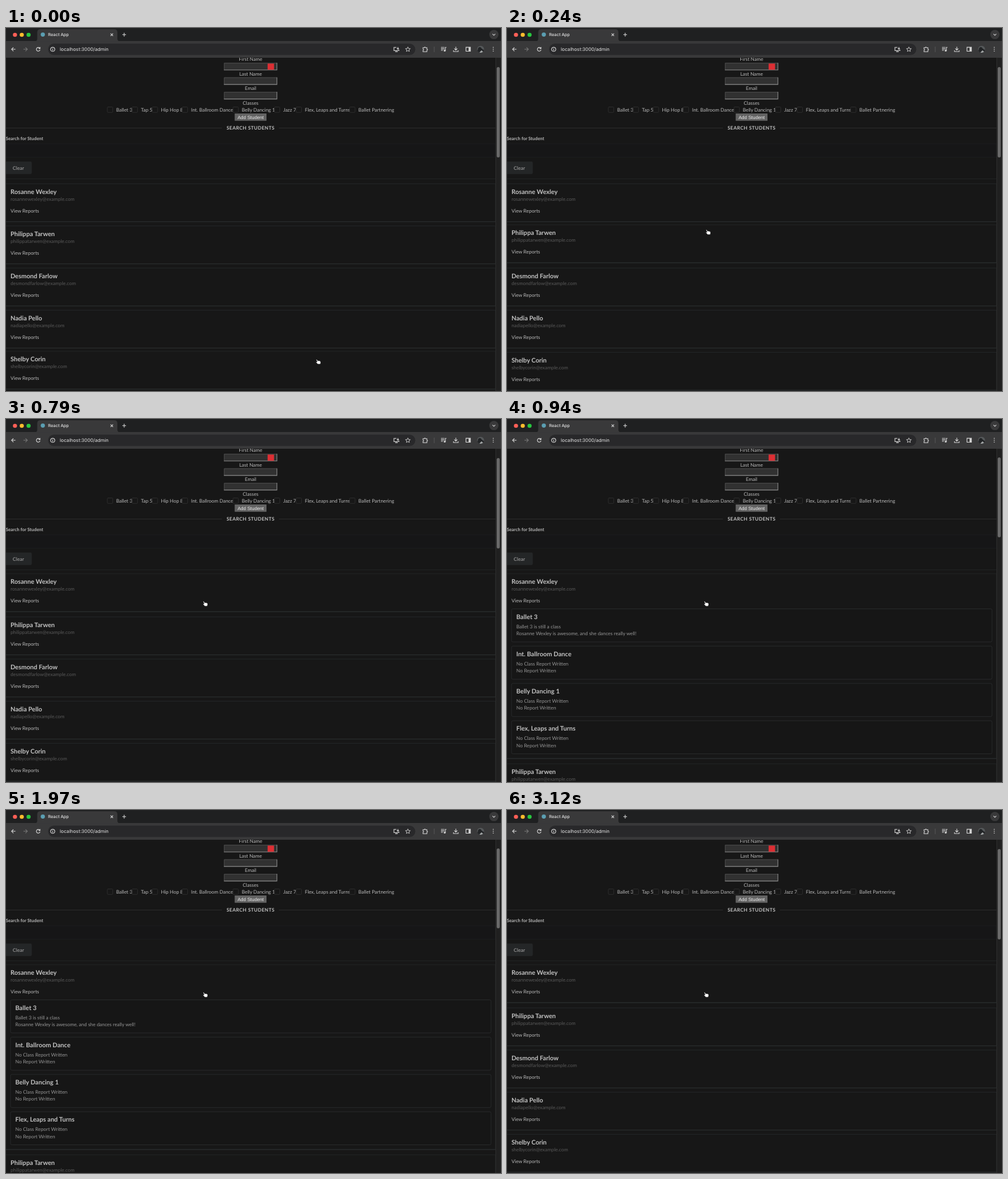
Recreate the animation shown at these times as an HTML page. Size 800 by 586 pixels, loop 3.24 s.

```html
<!DOCTYPE html>
<html lang="en">
<head>
<meta charset="utf-8">
<title>React App</title>
<style>
  html, body { margin: 0; width: 100%; height: 100%; overflow: hidden; background: #171717; }
  svg { display: block; width: 100vw; height: 100vh; }
  text { font-family: Lato, sans-serif; font-size: 7.9px; fill: #b8b8b8; text-rendering: geometricPrecision; white-space: pre; }
  .ui { font-family: Inter, sans-serif; fill: #e6e6e6; }
  .name { font-size: 10.16px; font-weight: 700; fill: #c2c2c2; }
  .mail { fill: #585858; }
  .body { fill: #959595; }
  .icon { fill: none; stroke: #d2d2d2; stroke-width: 1.1; }
</style>
</head>
<body>
<svg id="stage" viewBox="0 0 800 586" preserveAspectRatio="none"></svg>
<script>
const LOOP = 3240, OPEN = 820, CLOSE = 2820;
const LIFT = 1.7, GROW = 237.2, ROW = 68;

// name, hover start, hover end (ms)
const students = [
  ['Rosanne Wexley', 350, 1e6],
  ['Philippa Tarwen', 112, 330],
  ['Desmond Farlow', 70, 112],
  ['Nadia Pello', 20, 70],
  ['Shelby Corin', -1e3, 20],
];
const reports = ['Ballet 3', 'Int. Ballroom Dance', 'Belly Dancing 1', 'Flex, Leaps and Turns'];
const classes = [
  ['Ballet 3', 178], ['Tap 5', 218], ['Hip Hop 8', 250.5], ['Int. Ballroom Dance', 299],
  ['Belly Dancing 1', 381], ['Jazz 7', 448], ['Flex, Leaps and Turns', 483], ['Ballet Partnering', 569.5],
];
// time, x, y
const track = [
  [0, 506, 540], [120, 353, 377], [200, 330, 338],
  [300, 322, 322], [390, 321, 306], [550, 322, 298],
];

const text = (x, y, s, attrs = '') => `<text x="${x}" y="${y}" ${attrs}>${s}</text>`;
const mid = (y, s, attrs = '') => text(395.3, y, s, `text-anchor="middle" ${attrs}`);
const rect = (x, y, w, h, fill, attrs = '') =>
  `<rect x="${x}" y="${y}" width="${w}" height="${h}" fill="${fill}" ${attrs}/>`;
const circle = (x, y, r, fill, attrs = '') => `<circle cx="${x}" cy="${y}" r="${r}" fill="${fill}" ${attrs}/>`;
const icon = (x, y, d, attrs = '') => `<path class="icon" transform="translate(${x} ${y})" d="${d}" ${attrs}/>`;

function browser() {
  const lights = ['#fe5f57', '#febc2e', '#28c840'].map((c, i) => circle(14.5 + 11 * i, 11, 3.3, c)).join('');
  const dots = [-3, 0, 3].map(d => circle(787.5, 34.3 + d, 0.8, '#d2d2d2')).join('');
  return rect(0, 0, 800, 22, '#1f2021') + rect(0, 21, 800, 27, '#39393a') + lights +
    '<path fill="#39393a" d="M46 21.5Q50.5 21.5 50.5 17V7Q50.5 2 55.5 2H175Q180 2 180 7V17Q180 21.5 184.5 21.5Z"/>' +
    circle(59.5, 10.6, 3.4, '#5b9fb2') +
    text(68, 13.1, 'React App', 'class="ui" style="font-size:6.8px;font-weight:500"') +
    icon(171, 10.8, 'M-2-2L2 2M2-2L-2 2') +
    icon(191, 10.8, 'M-3 0H3M0-3V3') +
    circle(788.5, 10.6, 7.5, '#39393a') + icon(788.5, 10.6, 'M-2.2-1L0 1.2L2.2-1') +
    icon(12, 34.3, 'M3.3 0H-3M0-3L-3 0L0 3') +
    icon(31.5, 34.3, 'M-3.3 0H3M0-3L3 0L0 3', 'style="stroke:#757575"') +
    icon(52, 34.3, 'M2.6-1.6A3 3 0 1 0 3 .8M3-3.6V-1.2H.6') +
    rect(68, 25.2, 593.5, 18.4, '#28282a', 'rx="9.2"') +
    icon(75.5, 34.4, 'M-3.4 0A3.4 3.4 0 1 0 3.4 0A3.4 3.4 0 1 0-3.4 0M0-.4V2M0-2.1V-1.2') +
    text(87, 37.1, 'localhost:3000/admin', 'class="ui" style="font-size:7.65px"') +
    icon(631, 34.3, 'M0-3H-4V2.2H4V.6M-2 3.8H2M2.4-3.6V.2M.7-1.5L2.4.2L4.1-1.5') +
    icon(649.5, 34.4, 'M0-3.8L1.1-1.2L3.9-1L1.8.8L2.4 3.5L0 2.1L-2.4 3.5L-1.8.8L-3.9-1L-1.1-1.2Z', 'style="stroke-width:.9"') +
    icon(677.5, 34.3, 'M-3.5-2.5H-1.2Q-.8-4.6.5-2.5H2.7V-.2Q4.8.6 2.7 1.8V4H-3.5V1.9Q-1.5.8-3.5-.4Z') +
    rect(691.6, 30, 0.9, 9, '#5b5b5b') +
    icon(707, 34.2, 'M-4-3H1.5M-4-.6H1.5M-4 1.8H-.8M3 2.2V-3H4.8') + circle(709, 36.5, 1.6, '#d2d2d2') +
    icon(727, 34.2, 'M0-4V1.2M-2.4-1L0 1.4L2.4-1M-3.8 1.8V3.8H3.8V1.8') +
    icon(747, 34.3, 'M-3.6-3.2H3.6V3.2H-3.6Z') + rect(747.6, 31, 3, 6.6, '#d2d2d2') +
    circle(767, 34.3, 5.6, '#55585a') +
    '<path fill="#222426" d="M762 37Q762.6 29.6 767 31Q769 34 772.4 35.5A5.6 5.6 0 0 1 762 37Z"/>' +
    '<path fill="#a2a5a6" d="M765 39.5L768.5 36L771 38.2A5.6 5.6 0 0 1 765 39.5Z"/>' + dots;
}

function form() {
  const fields = ['First Name', 'Last Name', 'Email'].map((label, i) => {
    const y = 56.2 + 23.45 * i;
    return mid(y - 2.9, label) + rect(352.3, y, 86, 12, '#313131') +
      `<path fill="none" stroke="#4b4b4b" d="M352.8 ${y + 12}V${y + .5}H438"/>` +
      `<path fill="none" stroke="#858585" stroke-width="1.1" d="M352.3 ${y + 11.5}H437.8V${y}"/>`;
  }).join('');
  const boxes = classes.map(([label, x]) =>
    rect(x - 14.2, 127.5, 8.8, 8.8, '#171717', 'rx="1.2" stroke="#363636" stroke-width=".7"') +
    text(x, 134.8, label)).join('');
  return fields + rect(422.8, 57.4, 10.4, 10, '#dc2f34') + mid(123.8, 'Classes') + boxes +
    rect(369.6, 138, 51.4, 11.8, '#636363', 'rx=".6"') +
    mid(146.5, 'Add Student', 'style="font-family:\'Liberation Sans\',sans-serif;font-size:7.7px;fill:#eee"') +
    rect(0, 161, 349, 0.9, '#2e2e2e') + rect(441, 161, 350, 0.9, '#2e2e2e') +
    mid(164.4, 'SEARCH STUDENTS', 'style="font-size:7.75px;font-weight:700;letter-spacing:.05em;fill:#c4c4c4"') +
    text(-0.3, 181.2, 'Search for Student', 'style="font-size:7.33px;font-weight:700"') +
    rect(-1, 187, 792, 21.4, '#161617', 'stroke="#1d1e20" stroke-width=".8"') +
    rect(-3, 215.6, 44.7, 20.2, '#242627', 'rx="2.2"') +
    text(10.8, 228.6, 'Clear', 'style="font-weight:700;fill:#8c8c8c"') +
    rect(0, 243, 791, 1, '#202223');
}

function report(title, i) {
  const y = 308.2 + 60.2 * i;
  const lines = i ? ['No Class Report Written', 'No Report Written']
    : ['Ballet 3 is still a class', `${students[0][0]} is awesome, and she dances really well!`];
  return rect(7.3, y, 776.6, 53.4, '#161616', 'rx="2.2" stroke="#2a2c2d" stroke-width=".9"') +
    text(15, y + 16.1, title, 'class="name"') +
    lines.map((s, n) => text(15, y + 31.2 + 11.3 * n, s, 'class="body"')).join('');
}

function card([name], i) {
  const y = 251.5 + ROW * i;
  const mail = name.toLowerCase().replace(' ', '') + '@example.com';
  return `<g id="card${i}">` +
    rect(-2, y, 793, 61, '#171717', 'class="panel" stroke="#222526" stroke-width="1"') +
    `<rect class="edge" x="0" y="${y + 60.6}" width="791" height="1.2" fill="#282b2c"/>` +
    text(7.2, y + 16.4, name, 'class="name"') +
    text(7.2, y + 27.5, mail, 'class="mail"') +
    text(7.2, y + 46.4, 'View Reports') +
    (i ? '' : `<g id="reports">${reports.map(report).join('')}</g>`) + '</g>';
}

const $ = id => document.getElementById(id);
$('stage').innerHTML = rect(0, 0, 800, 586, '#171717') + form() + students.map(card).join('') +
  rect(791, 48, 9, 538, '#202020') + rect(791, 48, 0.8, 538, '#303030') +
  rect(793, 63, 5, 146, '#696969', 'id="thumb" rx="2.5"') + browser() +
  '<path id="hand" fill="#fff" stroke="#000" stroke-width=".7" stroke-linejoin="round" ' +
  'd="M-3.6-3.4Q-2.8-4.6-2-3.4L-.8-1.5Q.6-2.2 1.2-1.4Q2.4-1.8 2.8-.9Q4-1 4 .4V2Q3.8 3.4 3 4.2H-.8Q-2.2 2.6-3.8 1Q-4-.1-2.6.1L-1.8.5Z"/>';

const cards = students.map((_, i) => $('card' + i));
const panel = cards[0].querySelector('.panel'), edge = cards[0].querySelector('.edge');

const ease = p => {
  p = Math.min(1, Math.max(0, p));
  return 1 - (1 - p) ** 2.2;
};
const lift = (t, from, to) => LIFT * ease((t - from) / 100) * (1 - ease((t - to) / 100));

// Cubic through the track points, slopes taken from the neighbours.
function along(t, axis) {
  const last = track.length - 1;
  if (t >= track[last][0]) return track[last][axis];
  const i = track.findIndex((p, n) => t < track[n + 1][0]);
  const slope = n => {
    if (n === last) return 0;
    const a = track[Math.max(0, n - 1)], b = track[n + 1];
    return (b[axis] - a[axis]) / (b[0] - a[0]);
  };
  const a = track[i], b = track[i + 1], d = b[0] - a[0], p = (t - a[0]) / d, q = 1 - p;
  return a[axis] * q * q * (1 + 2 * p) + b[axis] * p * p * (3 - 2 * p) +
    d * p * q * (slope(i) * q - slope(i + 1) * p);
}

function draw(t) {
  const open = t >= OPEN && t < CLOSE, grow = open ? GROW : 0;
  students.forEach(([, from, to], i) => {
    const y = (i ? grow : 0) - lift(t, from, to);
    cards[i].setAttribute('transform', `translate(0 ${y.toFixed(2)})`);
  });
  panel.setAttribute('height', 61 + grow);
  edge.setAttribute('y', 312.1 + grow);
  $('reports').style.display = open ? '' : 'none';
  $('thumb').setAttribute('y', open ? 62 : 63);
  $('thumb').setAttribute('height', open ? 129 : 146);
  $('hand').setAttribute('transform', `translate(${along(t, 1).toFixed(2)} ${along(t, 2).toFixed(2)})`);
}

const start = performance.now();
function tick() {
  draw((performance.now() - start) % LOOP);
  requestAnimationFrame(tick);
}
draw(0);
requestAnimationFrame(tick);
</script>
</body>
</html>
```
